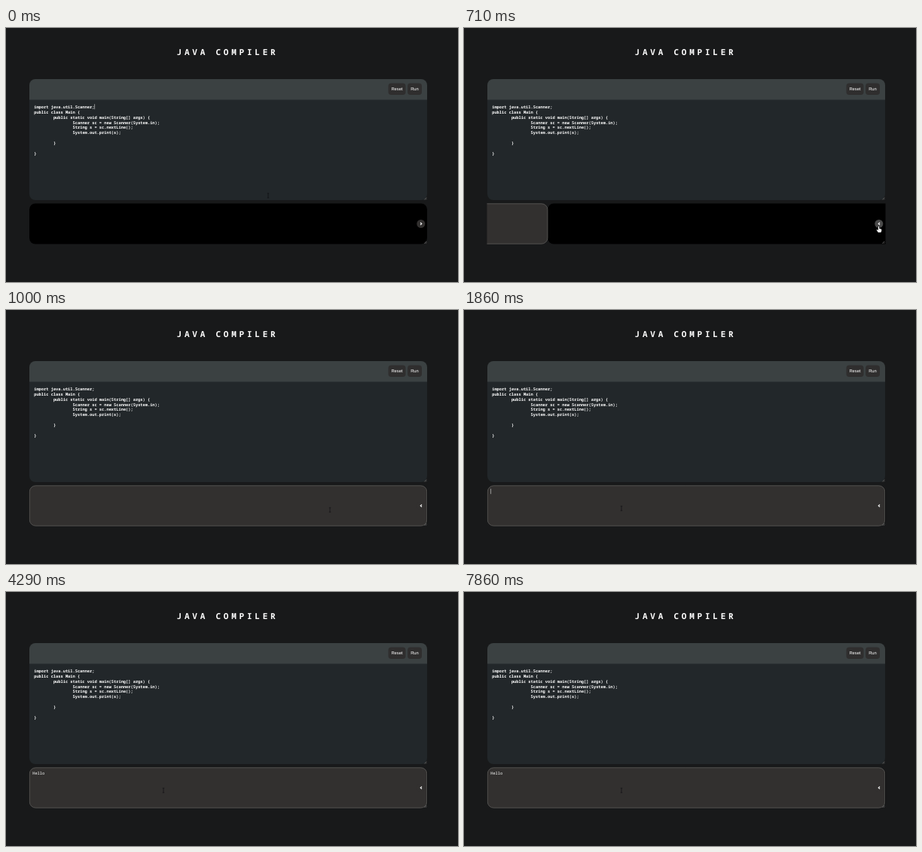
Write an HTML page with a canvas that moves like this. It is 600 by 338 pixels and loops after 8 s.

```html
<!DOCTYPE html>
<html lang="en">
<head>
<meta charset="utf-8">
<title>Java compiler</title>
<style>
  html, body { margin: 0; width: 100%; height: 100%; overflow: hidden; background: #18191a; }
  canvas { display: block; width: 100vw; height: 100vh; }
</style>
</head>
<body>
<canvas id="stage" width="600" height="338"></canvas>
<script>
const ctx = document.getElementById('stage').getContext('2d');
ctx.textRendering = 'geometricPrecision';

const LOOP = 8000, FPS = 7;
const MONO = '"Noto Sans Mono", "DejaVu Sans Mono", monospace';
const SANS = '"Liberation Sans", Arial, sans-serif';
const LEFT = 31, RIGHT = 559, WIDTH = RIGHT - LEFT;
const CHAR = 3.21;
const CODE = [
  'import java.util.Scanner;',
  'public class Main {',
  '\tpublic static void main(String[] args) {',
  '\t\tScanner sc = new Scanner(System.in);',
  '\t\tString s = sc.nextLine();',
  '\t\tSystem.out.print(s);',
  '',
  '\t}',
  '',
  '}'
];
const TYPED = 'Hello ';
const KEYS = [19, 21, 23, 24, 26, 28];
// Pointer path: step, x, y
const PATH = [[0, 348, 223], [1, 352, 224], [4, 549, 262], [5, 550, 264], [6, 549, 263.5],
  [7, 430, 266], [8, 206, 270], [9, 207, 266], [11, 209, 264]];

const smooth = t => { t = Math.min(1, Math.max(0, t)); return t * t * (3 - 2 * t); };

function box(x, y, w, h, r, fill, stroke) {
  ctx.beginPath();
  ctx.roundRect(x, y, w, h, r);
  ctx.fillStyle = fill;
  ctx.fill();
  if (stroke) {
    ctx.strokeStyle = stroke;
    ctx.lineWidth = 0.7;
    ctx.stroke();
  }
}

function text(str, x, y, font, color = '#fff', spacing = 0, align = 'left') {
  ctx.font = font;
  ctx.letterSpacing = spacing + 'px';
  ctx.textAlign = align;
  ctx.fillStyle = color;
  ctx.fillText(str, x, y);
}

function line(color, width, ...pts) {
  ctx.beginPath();
  pts.forEach(([x, y]) => ctx.lineTo(x, y));
  ctx.strokeStyle = color;
  ctx.lineWidth = width;
  ctx.stroke();
}

function grip(x, y) {
  line('#8a8a8a', 0.6, [x - 3, y], [x, y - 3]);
  line('#8a8a8a', 0.6, [x - 1.3, y], [x, y - 1.3]);
}

function button(label, x, w) {
  box(x, 73.5, w, 15.5, 4, '#2f2e2e');
  text(label, x + w / 2, 83.2, '5.8px ' + SANS, '#fff', 0, 'center');
}

function editor(caret) {
  box(LEFT, 68, WIDTH, 28, [8, 8, 0, 0], '#3b4142');
  box(LEFT, 95.5, WIDTH, 133.5, [0, 0, 8, 8], '#22272a');
  button('Reset', 507.5, 23);
  button('Run', 533, 19);
  CODE.forEach((row, i) => {
    const code = row.trimStart();
    const tabs = row.length - code.length;
    text(code, 37.2 + tabs * 8 * CHAR, 106.9 + i * 6.88, 'bold 5.35px ' + MONO);
  });
  if (caret) line('#ddd', 0.6, [117.6, 101.3], [117.6, 108.2]);
  grip(558.3, 228.5);
}

function consolePanes(time, step) {
  const shift = WIDTH * smooth((time - 652) / 253);
  ctx.save();
  ctx.beginPath();
  ctx.rect(LEFT - 0.5, 233, WIDTH + 1, 55);
  ctx.clip();
  box(LEFT + shift, 233.5, WIDTH, 54, 8, '#000');
  if (shift > 0) box(LEFT + shift - WIDTH + 0.3, 233.8, WIDTH - 0.6, 53.4, 8, '#32302f', '#656361');
  ctx.restore();

  const count = KEYS.filter(k => k <= step).length;
  text(TYPED.slice(0, count), 35.2, 243.1, '5.35px ' + MONO);
  if (inputCaret(step)) {
    const x = 35.6 + count * CHAR;
    line('#e0e0e0', 0.6, [x, 237.8], [x, 244.8]);
  }
  grip(558.3, 286.8);
}

// Caret restarts on focus and after the last key
function inputCaret(step) {
  if (step < 9) return false;
  if (step < KEYS[0]) return Math.ceil((step + 1 - 9.95) / 1.85) % 2 === 1;
  if (step < 30) return true;
  return Math.ceil((step + 1 - 30.35) / 1.82) % 2 === 0;
}

function toggle(step) {
  const open = step >= 5, hover = step >= 4 && step <= 6;
  box(545.3, 255, 11, 11, 5.5, hover ? '#4a4a4a' : '#32302f');
  const d = open ? -1 : 1;
  line('#fff', 1.1, [551 - d, 258.8], [551 + d * 0.8, 260.5], [551 - d, 262.2]);
}

function hand(x, y) {
  ctx.beginPath();
  [[0, 0], [1, 0], [1.2, 3], [4.2, 3.8], [4.2, 6], [3.4, 8], [-0.2, 8], [-2.4, 4.8], [-1.6, 4.2], [-0.2, 5.2]]
    .forEach(([dx, dy]) => ctx.lineTo(x + dx, y + dy));
  ctx.closePath();
  ctx.strokeStyle = '#111';
  ctx.lineWidth = 0.9;
  ctx.stroke();
  ctx.fillStyle = '#fff';
  ctx.fill();
}

function pointer(step) {
  let i = 0;
  while (i < PATH.length - 2 && PATH[i + 1][0] <= step) i++;
  const [s0, x0, y0] = PATH[i], [s1, x1, y1] = PATH[i + 1];
  const p = smooth((step - s0) / (s1 - s0));
  const x = x0 + (x1 - x0) * p, y = y0 + (y1 - y0) * p;
  if (step >= 4 && step <= 6) return hand(x, y);
  const c = '#0c0d0e';
  line(c, 0.6, [x, y - 3], [x, y + 3]);
  line(c, 0.6, [x - 1.2, y - 3], [x + 1.2, y - 3]);
  line(c, 0.6, [x - 1.2, y + 3], [x + 1.2, y + 3]);
}

function draw(now) {
  const step = Math.floor((now % LOOP + 5) * FPS / 1000) % (LOOP * FPS / 1000);
  const time = step * 1000 / FPS;
  ctx.fillStyle = '#18191a';
  ctx.fillRect(0, 0, 600, 338);
  text('JAVA COMPILER', 226.6, 35.8, 'bold 11px ' + MONO, '#fff', 3.77);
  editor(step < 2);
  consolePanes(time, step);
  toggle(step);
  pointer(step);
  requestAnimationFrame(draw);
}
requestAnimationFrame(draw);
</script>
</body>
</html>
```
